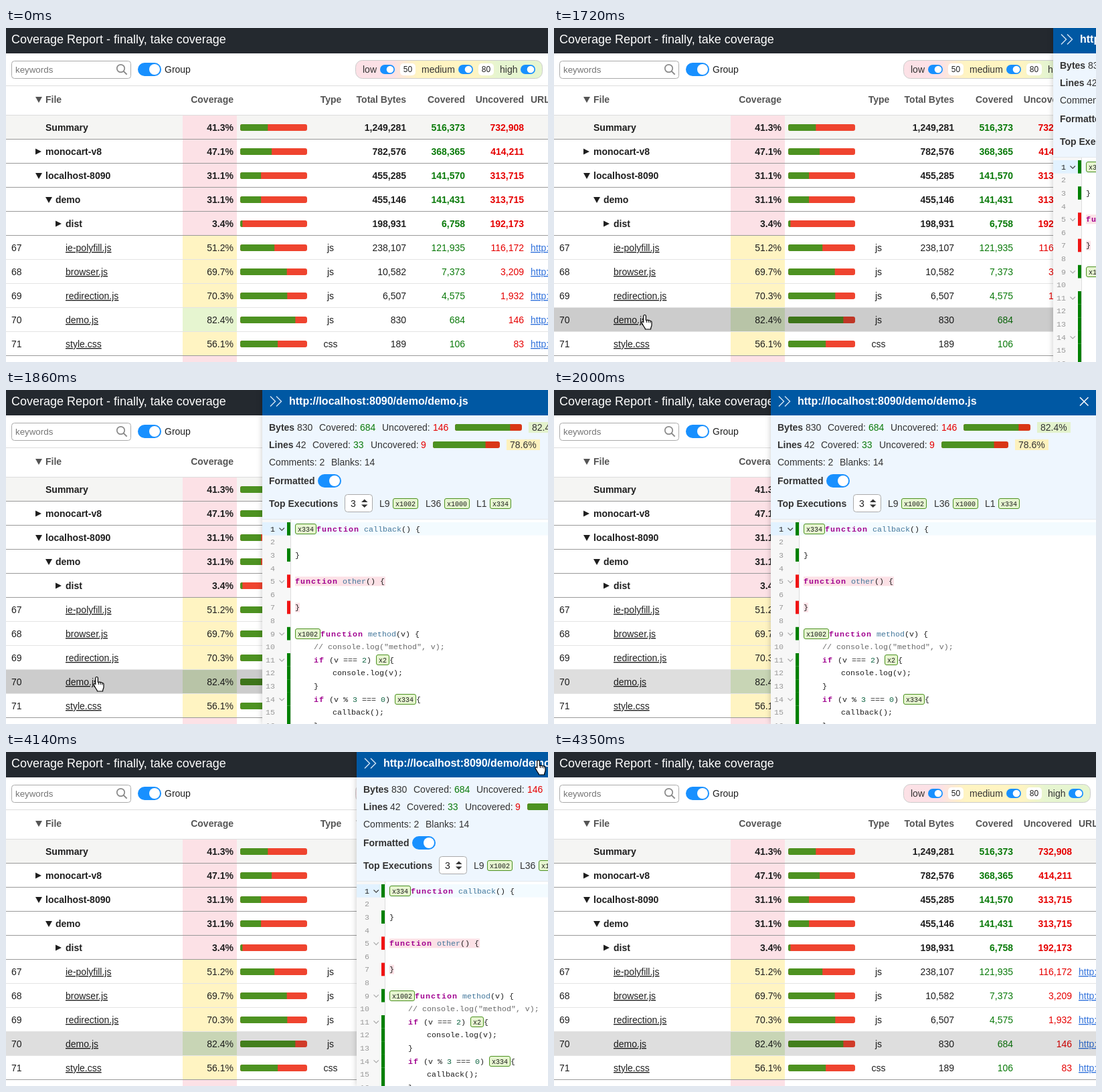
Write an HTML page that moves like this. It is 810 px wide and 500 px high and loops after 4550 ms.

```html
<!DOCTYPE html>
<html lang="en">
<head>
<meta charset="utf-8">
<title>Coverage Report</title>
<style>
html, body { margin: 0; width: 100%; height: 100%; overflow: hidden; background: #fff; }
svg { display: block; width: 810px; height: 500px; }
text { font: 14px "Liberation Sans", Arial, sans-serif; fill: #1f1f1f; white-space: pre; }
.bold { font-weight: bold; }
.end { text-anchor: end; }
.mid { text-anchor: middle; }
.good { fill: #0a7a0a; }
.bad { fill: #e60000; }
.head { font-weight: bold; fill: #555; }
.soft { fill: #333; }
.title { font-size: 18px; fill: #fff; }
.url { font-size: 16px; font-weight: bold; fill: #fff; }
.hint { font-size: 13.33px; fill: #757575; }
.small { font-size: 12px; }
.name { text-decoration: underline; }
.link { fill: #3273dc; text-decoration: underline; }
.code, .word, .tag { font-family: "Liberation Mono", monospace; font-size: 11.67px; }
.word { font-weight: bold; fill: #a0008f; letter-spacing: 1px; }
.tag { font-size: 10px; }
.def { fill: #44789c; }
.note { fill: #6b6b6b; }
.num { fill: #116644; }
.line { fill: #999; }

#shade, #panel, #arrow, #hand, #disc { animation: 4550ms step-end infinite; }
#shade { animation-name: shade; }
#panel { animation-name: slide; filter: drop-shadow(0 0 4px rgba(0,0,0,.22)); }
#arrow { animation-name: arrow; }
#hand { animation-name: hand; }
#disc { animation-name: disc; }
@keyframes shade {
  0%, 100% { opacity: 0; }
  36.263% { opacity: .08; }
  37.802% { opacity: .2; }
  43.956% { opacity: .13; }
}
@keyframes slide {
  0%, 95.604%, 100% { transform: translateX(510px); }
  37.802% { transform: translateX(422px); }
  39.34% { transform: translateX(198px); }
  40.879% { transform: translateX(59px); }
  42.417% { transform: translateX(11px); }
  43.956% { transform: translateX(0); }
  90.989% { transform: translateX(200px); }
  92.527% { transform: translateX(382px); }
  94.065% { transform: translateX(456px); }
}
@keyframes arrow {
  0%, 37.802%, 100% { opacity: 0; }
  36.263% { opacity: 1; }
}
@keyframes hand {
  0%, 43.956%, 95.604%, 100% { opacity: 0; transform: translate(130px, 428px); }
  37.802% { opacity: 1; transform: translate(130px, 428px); }
  89.45% { opacity: 1; transform: translate(790px, 11px); }
}
@keyframes disc {
  0%, 37.802%, 90.989%, 100% { opacity: 0; transform: translate(134px, 431px); }
  36.263% { opacity: .65; transform: translate(134px, 431px); }
  89.45% { opacity: .65; transform: translate(795px, 12px); }
}
</style>
</head>
<body>
<svg id="stage" viewBox="0 0 810 500" xmlns="http://www.w3.org/2000/svg"></svg>
<script>
const LOW = '#fce1e6', MID = '#fff4c2', HIGH = '#e6f5d0';
const GREEN = '#4d9221', RED = '#ef442f', BLUE = '#1890ff';

const text = (x, y, s, cls = '') => `<text x="${x}" y="${y}" class="${cls}">${s}</text>`;
const rect = (x, y, w, h, fill, extra = '') =>
  `<rect x="${x}" y="${y}" width="${w}" height="${h}" fill="${fill}" ${extra}/>`;
const path = (d, stroke, width = 1, fill = 'none') =>
  `<path d="${d}" stroke="${stroke}" stroke-width="${width}" fill="${fill}"/>`;
const box = (x, y, w, h, r, fill, stroke) =>
  rect(x + .5, y + .5, w - 1, h - 1, fill, `rx="${r}" stroke="${stroke}"`);
const toggle = (x, y, w, h, gap) =>
  rect(x, y, w, h, BLUE, `rx="${h / 2}"`) +
  `<circle cx="${x + w - h / 2}" cy="${y + h / 2}" r="${h / 2 - gap}" fill="#fff"/>`;
const bar = (x, y, pct, red = RED) =>
  rect(x, y, 100, 10, red, 'rx="3"') +
  `<path d="M${x + pct} ${y}H${x + 3}a3 3 0 0 0-3 3v4a3 3 0 0 0 3 3H${x + pct}z" fill="${GREEN}"/>`;
const caret = (x, y, open, fill = '#1f1f1f') =>
  `<path d="${open ? `M${x} ${y - 4}h10l-5 9z` : `M${x} ${y - 4.5}v9l9-4.5z`}" fill="${fill}"/>`;
const tag = (x, y, s) =>
  box(x, y, s.length * 6 + 8, 16, 2.5, HIGH, GREEN) + text(x + 4, y + 11.5, s, 'tag');

// name, indent, caret state, percent, type, total, covered, uncovered
const rows = [
  ['Summary', 59, null, 41.3, '', '1,249,281', '516,373', '732,908'],
  ['monocart-v8', 59, false, 47.1, '', '782,576', '368,365', '414,211'],
  ['localhost-8090', 59, true, 31.1, '', '455,285', '141,570', '313,715'],
  ['demo', 74, true, 31.1, '', '455,146', '141,431', '313,715'],
  ['dist', 89, false, 3.4, '', '198,931', '6,758', '192,173'],
  ['ie-polyfill.js', 89, null, 51.2, 'js', '238,107', '121,935', '116,172'],
  ['browser.js', 89, null, 69.7, 'js', '10,582', '7,373', '3,209'],
  ['redirection.js', 89, null, 70.3, 'js', '6,507', '4,575', '1,932'],
  ['demo.js', 89, null, 82.4, 'js', '830', '684', '146'],
  ['style.css', 89, null, 56.1, 'css', '189', '106', '83']
];

function row([name, x, open, pct, type, total, covered, missed], i) {
  const top = 131 + i * 36, y = top + 23, leaf = i > 4;
  const b = leaf ? '' : 'bold ';
  const level = pct < 50 ? LOW : pct < 80 ? MID : HIGH;
  return (i ? '' : rect(0, top, 810, 35, '#f5f5f3')) +
    rect(264, top, 81, 36, level) +
    rect(0, top + 35, 810, 1, leaf && i < 9 ? '#e4e4e4' : '#999') +
    (leaf ? text(8, y, 62 + i) + text(784, y, 'http://localhost:8090/', 'link') : '') +
    (open === null ? '' : caret(x - 15, top + 18, open)) +
    text(x, y, name, leaf ? 'name' : 'bold') +
    text(340, y, pct.toFixed(1) + '%', b + 'end') +
    bar(350, top + 13, pct) +
    text(485, y, type, 'mid') +
    text(598, y, total, b + 'end') +
    text(686, y, covered, b + 'end good') +
    text(774, y, missed, b + 'end bad');
}

function report() {
  const heads = [[59, 'File', ''], [340, 'Coverage', 'end'], [485.5, 'Type', 'mid'],
    [598, 'Total Bytes', 'end'], [686, 'Covered', 'end'], [774, 'Uncovered', 'end'], [784, 'URL', '']];
  return rect(0, 0, 810, 500, '#fff') +
    rect(0, 0, 810, 38, '#24292f') +
    text(8, 23, 'Coverage Report - finally, take coverage', 'title') +
    box(8, 49, 179, 27, 4, '#fff', '#aaa') +
    text(14, 67, 'keywords', 'hint') +
    `<circle cx="171.5" cy="60.5" r="5.7" fill="none" stroke="#888" stroke-width="1.7"/>` +
    path('M175.6 64.6l5 5', '#888', 2) +
    toggle(197, 52, 35, 20, 2) + text(237, 67, 'Group') +
    box(522, 48, 280, 28, 10, 'url(#scale)', '#ccc') +
    text(533, 67, 'low', 'soft') + text(621, 67, 'medium', 'soft') + text(738, 67, 'high', 'soft') +
    [559, 676, 769].map(x => toggle(x, 55, 22, 14, 1.7)).join('') +
    [[589, 50], [706, 80]].map(([x, n]) =>
      rect(x, 53, 23, 18, '#fff', 'rx="5"') + text(x + 11.5, 66, n, 'small mid')).join('') +
    rect(0, 86, 810, 1, '#ddd') + rect(0, 130, 810, 1, '#ddd') +
    caret(44, 107, true, '#555') +
    heads.map(([x, s, c]) => text(x, 112, s, 'head ' + c)).join('') +
    rows.map(row).join('') +
    rect(264, 491, 81, 9, LOW) +
    rect(0, 419, 810, 35, '#000', 'id="shade" opacity="0"');
}

function summary() {
  const stat = (y, items) => items.map(([x, s, c = 'soft']) => text(x, y, s, c)).join('');
  return rect(324, 0, 486, 38, '#0058a3') +
    path('M336 9.5l7.5 7.5-7.5 7.5M345 9.5l7.5 7.5-7.5 7.5', '#d5e6f5', 1.4) +
    text(364, 22, 'http://localhost:8090/demo/demo.js', 'url') +
    path('M786 11l12.5 12.5M798.5 11L786 23.5', '#fff', 1.5) +
    rect(324, 38, 486, 156, '#eef6fe') + rect(324, 193, 486, 1, '#e3e8ec') +
    stat(61, [[334, 'Bytes', 'bold soft'], [376, 830], [409, 'Covered:'], [470, 684, 'good'],
      [503, 'Uncovered:'], [579, 146, 'bad']]) +
    bar(612, 51, 82.4, '#d93616') + rect(722, 48, 50, 16, '#e3f2cc') + text(727, 61, '82.4%', 'soft') +
    stat(87, [[334, 'Lines', 'bold soft'], [374, 42], [399, 'Covered:'], [460, 33, 'good'],
      [486, 'Uncovered:'], [561, 9, 'bad']]) +
    bar(579, 77, 78.6, '#d93616') + rect(689, 74, 50, 16, '#fdf1bd') + text(694, 87, '78.6%', 'soft') +
    stat(113, [[334, 'Comments: 2'], [427, 'Blanks: 14']]) +
    text(334, 141, 'Formatted', 'bold soft') + toggle(407, 126, 35, 20, 2) +
    text(334, 175, 'Top Executions', 'bold soft') +
    box(447, 156, 42, 27, 4, '#fff', '#aaa') + text(456, 175, 3) +
    '<path d="M472 168h9.5l-4.75-4.5zM472 171.500h9.500l-4.750 4.500z" fill="#333"/>' +
    stat(175, [[499, 'L9'], [568, 'L36'], [644, 'L1']]) +
    tag(519, 162, 'x1002') + tag(596, 162, 'x1000') + tag(664, 162, 'x334');
}

// Each source line: indent followed by [kind, string] pieces.
const lines = [
  [0, ['tag', 'x334'], ['word', 'function'], ['code def', ' callback'], ['code', '() {']],
  [0],
  [0, ['code', '}']],
  [0],
  [0, ['word', 'function'], ['code def', ' other'], ['code', '() {']],
  [0],
  [0, ['code', '}']],
  [0],
  [0, ['tag', 'x1002'], ['word', 'function'], ['code def', ' method'], ['code', '(v) {']],
  [4, ['code note', '// console.log("method", v);']],
  [4, ['word', 'if'], ['code', ' (v === '], ['code num', '2'], ['code', ') '], ['tag', 'x2'], ['code', '{']],
  [8, ['code', 'console.log(v);']],
  [4, ['code', '}']],
  [4, ['word', 'if'], ['code', ' (v % '], ['code num', '3'], ['code', ' === '], ['code num', '0'],
    ['code', ') '], ['tag', 'x334'], ['code', '{']],
  [8, ['code', 'callback();']],
  [4, ['code', '}']]
];

function codeLine([indent, ...parts], i) {
  const n = i + 1, top = 198 + i * 19.6, y = top + 13.7;
  const missed = n === 5 || n === 7;
  const marked = missed || [1, 3, 9].includes(n) || n > 10;
  let out = n === 1 ? rect(324, top, 42, 19.6, '#e2f2ff') + rect(367, top, 443, 19.6, '#f3fbff') : '';
  out += text(343, y, n, 'code end ' + (n > 1 ? 'line' : ''));
  if ([1, 5, 9, 11, 14].includes(n))
    out += path(`M349.500 ${top + 8.5}l3.7 3.7 3.700-3.700`, n > 1 ? '#aaa' : '#444', 1.2);
  if (marked) out += rect(361, top, 5, 19.7, missed ? '#f01414' : '#008000');
  if (missed) out += rect(373, top + 3, n === 5 ? 135 : 7, 14, LOW);
  let x = 373 + indent * 7;
  for (const [kind, s] of parts) {
    if (kind === 'tag') {
      out += tag(x, Math.round(top + 2), s);
      x += s.length * 6 + 8;
    } else {
      out += text(x, y, s, kind);
      x += s.length * (kind === 'word' ? 8 : 7);
    }
  }
  return out;
}

const code = () => rect(324, 194, 486, 306, '#fff') +
  rect(324, 194, 42, 306, '#f7f7f7') + rect(366, 194, 1, 306, '#ddd') +
  lines.map(codeLine).join('');

const pointers =
  '<circle id="disc" r="12" fill="#f5ee1c" opacity="0"/>' +
  `<g id="arrow" opacity="0"><g transform="translate(134.5 428.5)">${
    path('M0 0v16l4-3.5 2.5 6 2.600-1.100-2.500-5.900h5z', '#000', 1, '#fff')}</g></g>` +
  `<g id="hand" opacity="0">${
    path('M5.5 1.500c1.200 0 1.900.8 1.900 2v6l1 .2c.5-.9 2.300-.8 2.800.3.7-.6 2.300-.3 2.600.8 ' +
      '1-.3 2.200.3 2.200 1.600v4.300c0 2-1.500 3.500-1.500 6.300h-8c0-1.600-1.500-2.800-2.300-4.200' +
      'L1.200 13.600c-.8-1.400.8-2.800 2.200-1.600l.3.300V3.500c0-1.200.8-2 1.800-2z', '#000', 1.2, '#fff') +
    path('M8.400 10v3M11.200 10.500v2.500M13.800 11.500v2', '#000', 1)}</g>`;

document.getElementById('stage').innerHTML =
  `<defs><linearGradient id="scale">
    <stop offset=".2" stop-color="${LOW}"/><stop offset=".33" stop-color="${MID}"/>
    <stop offset=".63" stop-color="${MID}"/><stop offset=".76" stop-color="${HIGH}"/>
  </linearGradient></defs>` +
  report() + `<g id="panel">${summary()}${code()}</g>` + pointers;
</script>
</body>
</html>
```
